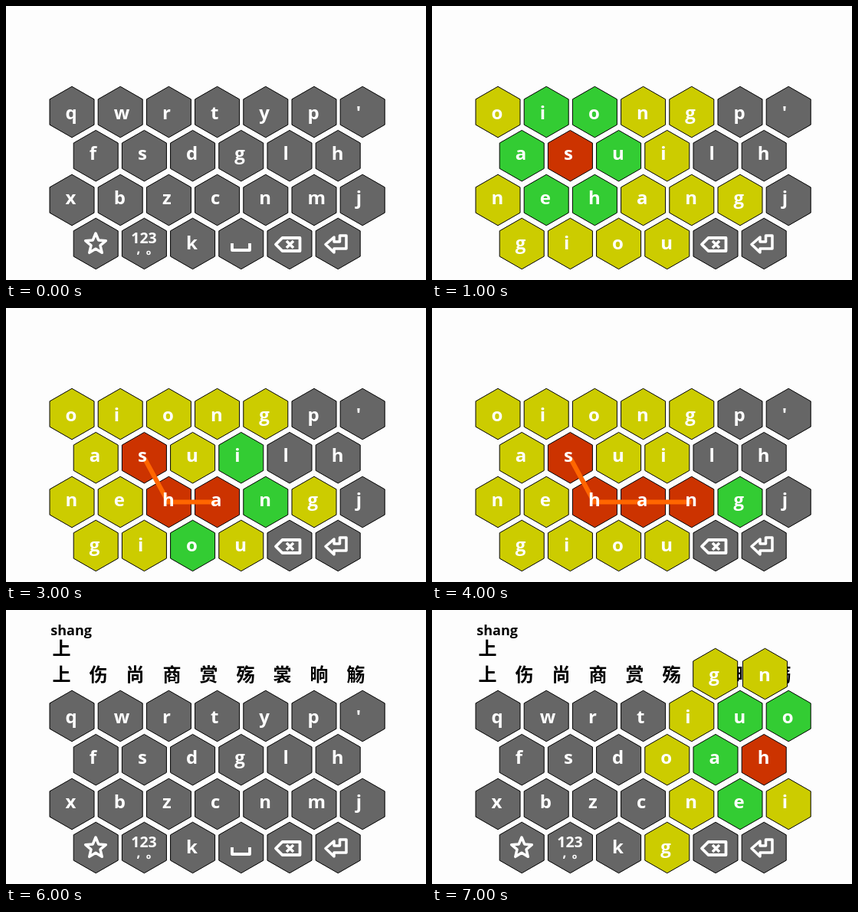
Animation of 548 by 358 pixels, one loop 8 s. Source, as an HTML page:

```html
<!DOCTYPE html>
<html lang="zh">
<head>
<meta charset="utf-8">
<style>
html, body { margin: 0; width: 100%; height: 100%; overflow: hidden; background: #fdfdfd; }
svg { display: block; width: 548px; height: 358px; }
text { font-family: "Open Sans", "Noto Sans", sans-serif; font-weight: 700; }
.han { font-family: "Noto Sans CJK SC", "Noto Sans CJK", sans-serif; }
</style>
</head>
<body>
<svg id="stage" viewBox="0 0 548 358"></svg>
<script>
const stage = document.getElementById("stage");
const STEP = 1000;
const FILL = { ".": "#666666", y: "#cccc00", g: "#33cc33", r: "#cc3300" };
const ROWS = [
  { n: 7, x: 86, y: 138.5, base: 148 },
  { n: 6, x: 117.2, y: 195.7, base: 200.5 },
  { n: 7, x: 86, y: 253.5, base: 258.5 },
  { n: 6, x: 117.2, y: 310.5, base: 317.5 }
];
const KEYS = ROWS.flatMap(r =>
  Array.from({ length: r.n }, (_, i) => ({ x: r.x + 63.2 * i, y: r.y, base: r.base })));
// two keys that pop up above the top row
KEYS.push({ x: 369.7, y: 83.5, base: 93 }, { x: 434.5, y: 83.5, base: 93 });

const HOME = "qwrtyp' fsdglh xbzcnmj *#k_<>";
const S_POP = "oiongp' asuilh nehangj giou<>";
const H_POP = "qwrtiuo fsdoah xbzcnei *#kg<> gn";
const PLAIN = "....... ...... ....... ......";
const STATES = [
  { keys: HOME, tint: PLAIN },
  { keys: S_POP, tint: "yggyy.. grgy.. yggyyy. yyyy.." },
  { keys: S_POP, tint: "yyyyy.. yrgy.. ygrgyy. yggy..", end: 211.5 },
  { keys: S_POP, tint: "yyyyy.. yryg.. yyrrgy. yygy..", end: 275 },
  { keys: S_POP, tint: "yyyyy.. yryy.. yyrrrg. yyyy..", end: 338.5 },
  { keys: S_POP, tint: "yyyyy.. yryy.. yyrrrr. yyyy..", end: 401.5 },
  { keys: HOME, tint: PLAIN, typed: true },
  { keys: H_POP, tint: "....ygg ...ygr ....ygy ...y.. yy", typed: true }
];

const label = (x, y, size, s, extra = "") =>
  `<text x="${x}" y="${y}" font-size="${size}" ${extra}>${s}</text>`;
const outline = (d, w = 3.8) =>
  `<path d="${d}" fill="none" stroke="#fff" stroke-width="${w}" stroke-linejoin="round"/>`;

function star(cx, cy) {
  const pts = Array.from({ length: 10 }, (_, i) => {
    const r = i % 2 ? 6.3 : 14, a = Math.PI * (i / 5 - 0.5);
    return `${cx + r * Math.cos(a)} ${cy + r * Math.sin(a)}`;
  });
  return outline(`M${pts.join("L")}Z`, 3.5);
}

const ICONS = {
  "*": star(117, 311),
  "#": label(180, 310, 19.5, "123", 'fill="#fff" text-anchor="middle"') +
       label(170.5, 323, 17, ",", 'fill="#fff"') +
       '<circle cx="186" cy="322.5" r="2" fill="none" stroke="#fff" stroke-width="1.5"/>',
  "_": outline("M295 310V319H318V310"),
  "<": outline("M352 311.5L360.5 303H383.5V320H360.5Z") +
       outline("M366 307L375 316M375 307L366 316", 3.5),
  ">": outline("M417 311.5L428 302V308H435.5V300H444V317H428V322Z", 3.5)
};

function hex(k, fill) {
  const w = 29, r = 33.3;
  return `<path d="M${k.x} ${k.y - r}l${w} ${r / 2}v${r}l${-w} ${r / 2}l${-w} ${-r / 2}v${-r}z" fill="${fill}" stroke="#000"/>`;
}

const face = (k, c) => ICONS[c] || label(k.x - 8.5, k.base, 24, c, 'fill="#fff"');

const typedText = () =>
  label(58.3, 33, 18, "shang") +
  label(72.5, 59, 24, "上", 'class="han" text-anchor="middle"') +
  [..."上伤尚商赏殇裳晌觞"].map((c, i) =>
    label(72.5 + 48 * i, 92.5, 24, c, 'class="han" text-anchor="middle"')).join("");

function picture({ keys, tint, end, typed }) {
  const chars = [...keys.replaceAll(" ", "")];
  const tints = tint.replaceAll(" ", "");
  const trail = end
    ? `<path d="M181 197L211.5 253.5H${end}" fill="none" stroke="#ff6600" stroke-width="6"/>` : "";
  return (typed ? typedText() : "") +
    chars.map((c, i) => hex(KEYS[i], FILL[tints[i]])).join("") + trail +
    chars.map((c, i) => face(KEYS[i], c)).join("");
}

const pictures = STATES.map(picture);
let shown = -1;

function draw(t) {
  const i = Math.floor(t / STEP) % pictures.length;
  if (i !== shown) stage.innerHTML = pictures[shown = i];
}

function tick() {
  draw(performance.now() - start);
  requestAnimationFrame(tick);
}
const start = performance.now();
tick();
</script>
</body>
</html>
```
